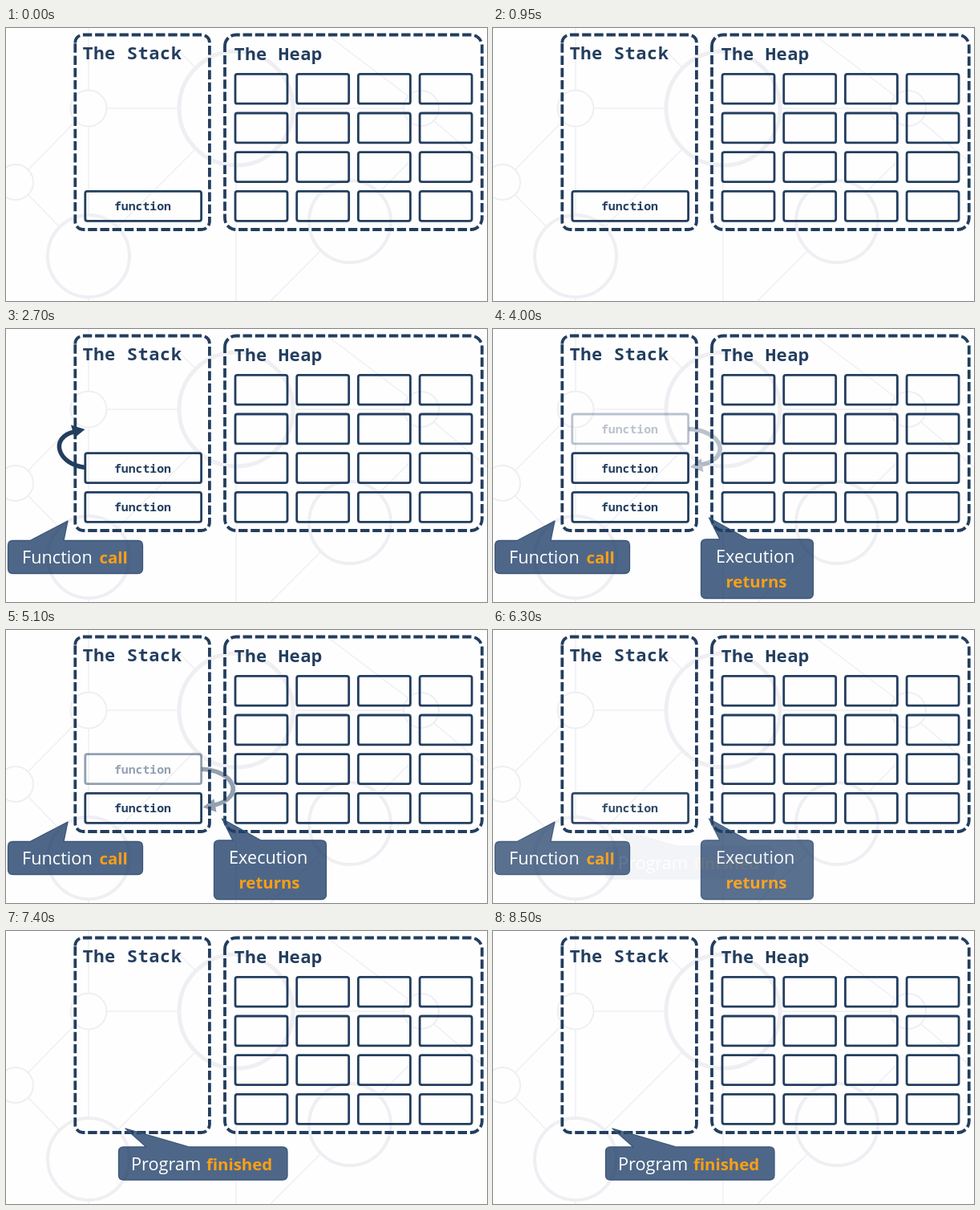
Animation, 600 px wide and 340 px high, one loop 8.55 s. Source, as an HTML page:

```html
<!DOCTYPE html>
<html lang="en">
<head>
<meta charset="utf-8">
<title>Stack and heap</title>
<style>
html, body { margin: 0; width: 100%; height: 100%; overflow: hidden; background: #fefeff; }
svg { display: block; width: 600px; height: 340px; }
.mono { font-family: "Noto Sans Mono", "DejaVu Sans Mono", monospace; font-weight: 600; fill: #233e5e; }
.title { font-size: 22px; letter-spacing: .6px; }
.label { font-size: 14.8px; text-anchor: middle; }
.note { font: 21.7px "Open Sans", "Noto Sans", sans-serif; fill: #fff; }
.key { font-weight: 700; font-size: 20.4px; fill: #ff9f14; }
.frame { fill: none; stroke: #233e5e; stroke-width: 3.8; stroke-dasharray: 11.4 3.8; }
.cell { fill: none; stroke: #233e5e; stroke-width: 2.8; }
.bubble { fill: #1f3f68; fill-opacity: .79; stroke: #3c5778; stroke-width: 1.3; stroke-linejoin: round; }
.curve { fill: none; stroke: #233e5e; stroke-width: 5.5; }
.head { fill: #233e5e; }
.web { fill: none; stroke: #efeff3; }
</style>
</head>
<body>
<svg id="stage" viewBox="0 0 600 340"></svg>
<script>
const LOOP = 8550, ROW = 48.7, BASE = 203.4;
const stage = document.getElementById("stage");

function add(parent, tag, attrs = {}, text) {
  const node = document.createElementNS("http://www.w3.org/2000/svg", tag);
  for (const key in attrs) node.setAttribute(key, attrs[key]);
  if (text) node.textContent = text;
  parent.appendChild(node);
  return node;
}

const ramp = (t, from, to) => Math.min(1, Math.max(0, (t - from) / (to - from)));
const cell = (parent, x, y, width) =>
  add(parent, "rect", { class: "cell", x, y, width, height: 36.9, rx: 2.5 });

function drawBackground() {
  const web = add(stage, "g", { class: "web" });
  [[103, 100, 22.5, 2], [12, 192, 22, 2], [103, 284, 51, 4],
   [287, 100, 71, 5], [429, 241, 51, 4], [518, 100, 22, 2]]
    .forEach(([cx, cy, r, w]) => add(web, "circle", { cx, cy, r, "stroke-width": w }));
  add(web, "path", {
    "stroke-width": 1.5,
    d: "M126 100H216M103 0V78M103 122V232M103 335V340M87 116L28 176M28 208L67 248" +
       "M139 248L237 150M287 171V340M358 100H496M393 277L330 340M210 23L237 50" +
       "M465 205L502 168M400 8L502 85M534 116L600 172"
  });
}

// The dashes run clockwise from the lower end of the top left corner.
function drawFrame(l, t, r, b, k) {
  add(stage, "path", {
    class: "frame",
    d: `M${l} ${t + k}A${k} ${k} 0 0 1 ${l + k} ${t}H${r - k}A${k} ${k} 0 0 1 ${r} ${t + k}` +
       `V${b - k}A${k} ${k} 0 0 1 ${r - k} ${b}H${l + k}A${k} ${k} 0 0 1 ${l} ${b - k}Z`
  });
}

function drawPanels() {
  drawFrame(86.3, 8.5, 253.9, 251, 10);
  drawFrame(273, 8.5, 593.8, 251, 14);
  add(stage, "text", { class: "mono title", x: 95.5, y: 38.5 }, "The Stack");
  add(stage, "text", { class: "mono title", x: 284.5, y: 40.3 }, "The Heap");
  for (let row = 0; row < 4; row++)
    for (let col = 0; col < 4; col++)
      cell(stage, 286 + col * 76.7, BASE - row * ROW, 65);
}

// Level 0 is the bottom of the stack.
function makeCall(level) {
  const g = add(stage, "g"), y = BASE - level * ROW;
  cell(g, 98.8, y, 144.8);
  add(g, "text", { class: "mono label", x: 170.4, y: y + 24 }, "function");
  return g;
}

// An arrow uncovered by a soft-edged vertical wipe.
function makeArrow(id, dy, curve, head, wipeFrom, wipeTo) {
  const grad = add(stage, "linearGradient",
    { id: id + "Edge", gradientUnits: "userSpaceOnUse", x1: 0, x2: 0 });
  add(grad, "stop", { offset: 0, "stop-color": "#fff" });
  add(grad, "stop", { offset: 1, "stop-color": "#000" });
  const mask = add(stage, "mask",
    { id, maskUnits: "userSpaceOnUse", x: 0, y: 0, width: 600, height: 340 });
  add(mask, "rect", { width: 600, height: 340, fill: `url(#${id}Edge)` });
  const node = add(stage, "g", { mask: `url(#${id})` });
  const shape = add(node, "g", { transform: `translate(0 ${dy})` });
  add(shape, "path", { class: "curve", d: curve });
  add(shape, "path", { class: "head", d: head });
  const soft = Math.sign(wipeTo - wipeFrom) * 6;
  return {
    node,
    wipe(p) {
      const edge = dy + wipeFrom + (wipeTo - wipeFrom) * p;
      grad.setAttribute("y1", edge - soft);
      grad.setAttribute("y2", edge + soft);
    }
  };
}

const callArrow = (id, dy) => makeArrow(id, dy,
  "M99 172.5C64 169 54 135 85 128", "M98.5 125L81 119.5L85.5 135.5Z", 182, 112);
const returnArrow = (id, dy) => makeArrow(id, dy,
  "M244 124.5C285 126 300 160 259 169.5", "M245.5 172L259.5 161.5L262.5 178Z", 115, 186);

// The pointer sits on the top edge between baseLeft and baseRight.
function makeBubble([l, t, r, b], [tipX, tipY], baseLeft, baseRight, texts) {
  const g = add(stage, "g"), k = 6;
  add(g, "path", {
    class: "bubble",
    d: `M${l + k} ${t}H${baseLeft}L${tipX} ${tipY}L${baseRight} ${t}H${r - k}` +
       `Q${r} ${t} ${r} ${t + k}V${b - k}Q${r} ${b} ${r - k} ${b}` +
       `H${l + k}Q${l} ${b} ${l} ${b - k}V${t + k}Q${l} ${t} ${l + k} ${t}Z`
  });
  texts.forEach(([x, y, text, key]) =>
    add(g, "text", { class: key ? "note key" : "note", x, y }, text));
  return g;
}

drawBackground();
drawPanels();

const calls = [0, 1, 2].map(makeCall);
const arrows = [
  callArrow("call1", ROW), callArrow("call2", 0),
  returnArrow("return1", 0), returnArrow("return2", ROW)
];
const callNote = makeBubble([2.5, 263.5, 170.5, 304.5], [77, 239], 30, 72,
  [[20, 292, "Function"], [116.5, 292, "call", true]]);
const returnNote = makeBubble([259.5, 262, 399.5, 335.5], [269.5, 235], 283, 318,
  [[278, 291, "Execution"], [290.5, 321.5, "returns", true]]);
const endNote = makeBubble([140.5, 269, 351, 310], [149, 246], 175, 229,
  [[156, 298, "Program"], [250, 298, "finished", true]]);

// [node, fade-in start, fade-in end, fade-out start, fade-out end]
const fades = [
  [calls[0], -1, 0, 6270, 6780],
  [calls[1], 2060, 2520, 4850, 5340],
  [calls[2], 2710, 3150, 3660, 4150],
  [arrows[0].node, -1, 0, 2060, 2520],
  [arrows[1].node, -1, 0, 2710, 3150],
  [arrows[2].node, -1, 0, 3660, 4150],
  [arrows[3].node, -1, 0, 4850, 5340],
  [callNote, 2060, 2520, 6270, 6780],
  [returnNote, 3150, 3600, 6270, 6780],
  [endNote, 6270, 6770, LOOP, LOOP + 1]
];
const wipes = [[1560, 2060], [2180, 2680], [3150, 3630], [4200, 4700]];

function render(t) {
  for (const [node, in0, in1, out0, out1] of fades)
    node.setAttribute("opacity", ramp(t, in0, in1) * (1 - ramp(t, out0, out1)));
  wipes.forEach(([from, to], i) => arrows[i].wipe(ramp(t, from, to)));
}

const start = performance.now();
function tick() {
  render((performance.now() - start) % LOOP);
  requestAnimationFrame(tick);
}
tick();
</script>
</body>
</html>
```
